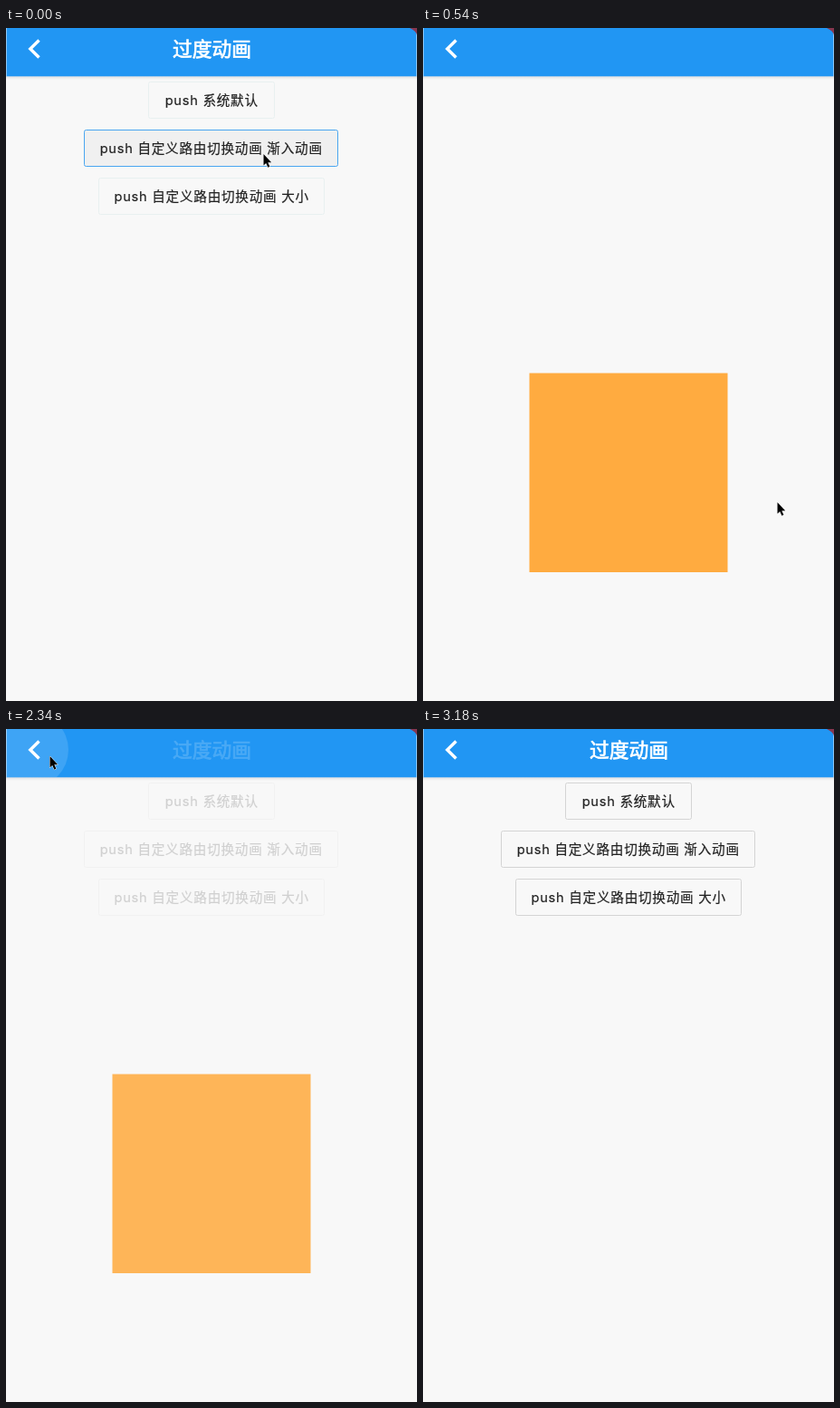
An HTML page that plays this animation: 454 by 742 pixels, repeating every 3240 ms.

```html
<!DOCTYPE html>
<html lang="zh-CN">
<head>
<meta charset="utf-8">
<style>
  html, body { margin: 0; width: 100%; height: 100%; overflow: hidden; background: #f8f8f8; }
  svg { display: block; }
  text { font-family: Inter, "Noto Sans CJK SC", "Noto Sans CJK", sans-serif; text-anchor: middle; }
  .btn text { font-size: 14.6px; letter-spacing: .75px; fill: #222; stroke: #222; stroke-width: .2; }
  .btn rect { fill: #f8f8f8; stroke: #d4d4d4; }
  .pressing .btn rect { stroke: #e8f0f0; }
  .pressing .btn.hit rect { fill: #f0f0f0; stroke: #4aa6f0; }
  #title { font-size: 21.8px; fill: #fff; stroke: #fff; stroke-width: .7; }
</style>
</head>
<body>
<svg width="454" height="742" viewBox="0 0 454 742">
  <defs>
    <linearGradient id="shade" x2="0" y2="1">
      <stop stop-color="#000" stop-opacity=".1"/>
      <stop offset="1" stop-color="#000" stop-opacity="0"/>
    </linearGradient>
    <clipPath id="barClip"><rect width="454" height="53"/></clipPath>
  </defs>
  <rect width="454" height="742" fill="#f8f8f8"/>
  <g id="buttons"></g>
  <rect id="square" x="117.5" y="380.5" width="219" height="219.5" fill="#ffab40"/>
  <rect y="53" width="454" height="4" fill="url(#shade)"/>
  <rect x=".5" width="453" height="53.3" fill="#2196f3"/>
  <circle id="ripple" cx="28" cy="23" fill="#fff" clip-path="url(#barClip)"/>
  <path d="M446 0H454V8Q453 3 446 0Z" fill="#86364f"/>
  <path d="M36.5 13.5 26.8 23 36.5 32.5" fill="none" stroke="#fff" stroke-width="3.4"/>
  <text id="title" x="227.5" y="31">过度动画</text>
  <path id="cursor" d="M.5 1V13.5L3.2 11 5.4 15.7 7.4 14.8 5.3 10.2H9.2Z" stroke="#fff" stroke-width="1" paint-order="stroke"/>
</svg>
<script>
const LOOP = 3240, STEP = 60;
const $ = id => document.getElementById(id);
const clamp = v => Math.min(1, Math.max(0, v));
const ramp = (t, start, length) => clamp((t - start) / length);

// label, left, width
const buttons = [
  ['push 系统默认', 157.5, 139],
  ['push 自定义路由切换动画 渐入动画', 86.5, 280],
  ['push 自定义路由切换动画 大小', 102.5, 249]
];
$('buttons').innerHTML = buttons.map(([label, x, w], i) => {
  const y = 59.5 + 53 * i;
  return `<g class="btn${i === 1 ? ' hit' : ''}">
     <rect x="${x}" y="${y}" width="${w}" height="40" rx="2"/>
     <text x="${x + w / 2 + .2}" y="${y + 25.5}">${label}</text>
   </g>`;
}).join('');

// time, x, y of the pointer tip
const path = [
  [0, 284, 138], [240, 284, 138], [420, 436, 420], [540, 391, 522],
  [840, 434, 700], [1140, 418, 684], [1320, 402, 602], [1440, 300, 380],
  [1620, 139, 131], [1860, 75, 60], [2100, 48, 29], [2340, 48, 29],
  [2460, 263, 347], [2580, 466, 645]
];

function pointer(t) {
  const i = path.findIndex(p => p[0] > t);
  if (i < 0) return path[path.length - 1].slice(1);
  const [t0, x0, y0] = path[i - 1], [t1, x1, y1] = path[i];
  const k = (t - t0) / (t1 - t0);
  return [x0 + (x1 - x0) * k, y0 + (y1 - y0) * k];
}

function draw(t) {
  const shown = t < 1200
    ? 1 - (1 - ramp(t, 30, 400)) ** 2.8
    : 1 - ramp(t, 2290, 380);
  const rest = 1 - shown ** 1.4;
  $('square').setAttribute('opacity', shown);
  $('buttons').setAttribute('opacity', rest);
  $('title').setAttribute('opacity', rest);
  $('buttons').classList.toggle('pressing', t < 120);

  $('ripple').setAttribute('r', 41 * ramp(t, 2240, 100));
  $('ripple').setAttribute('opacity', .13 * (1 - ramp(t, 2340, 120)));
  $('cursor').setAttribute('transform', `translate(${pointer(t)})`);
}

function tick(now) {
  draw(Math.floor(now % LOOP / STEP) * STEP);
  requestAnimationFrame(tick);
}
tick(performance.now());
</script>
</body>
</html>
```
